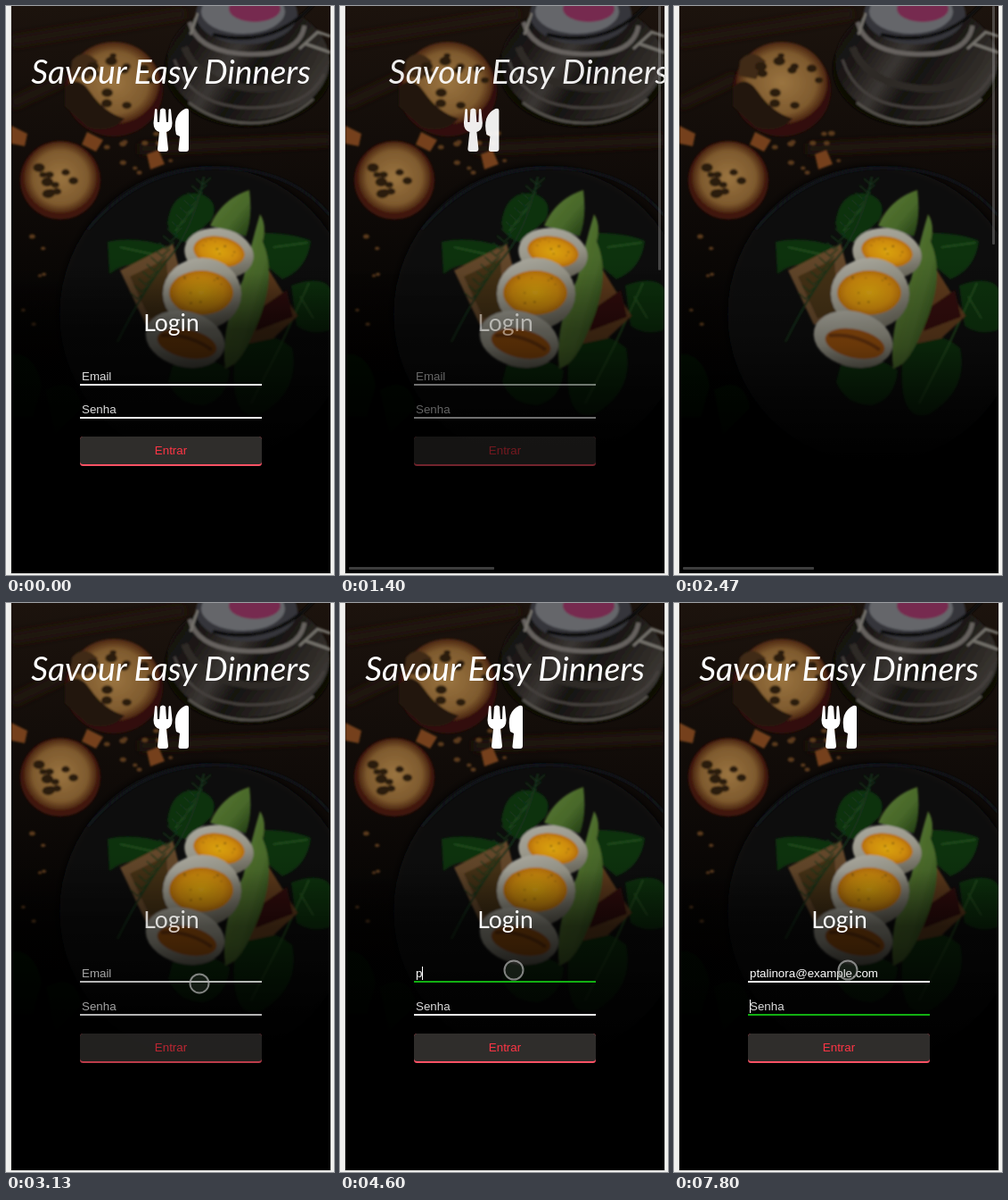
Animation of 368 by 637 pixels, one loop 8000 ms. Source, as an HTML page:

```html
<!DOCTYPE html>
<html lang="pt">
<head>
<meta charset="utf-8">
<title>Login</title>
<style>
  html, body { margin: 0; width: 100%; height: 100%; overflow: hidden; background: #f1f1ef; }
  svg { display: block; width: 100vw; height: 100vh; }
  .display { font-family: Lato, sans-serif; text-anchor: middle; fill: #fff; }
  .ui { font: 13.333px "Liberation Sans", Arial, sans-serif; }
</style>
</head>
<body>
<svg viewBox="0 0 368 637">
  <defs>
    <clipPath id="page"><rect x="6" width="358" height="635"/></clipPath>
    <linearGradient id="wood" x2="0" y2="1">
      <stop stop-color="#1c130d"/><stop offset=".3" stop-color="#100b08"/><stop offset=".7" stop-color="#000"/>
    </linearGradient>
    <linearGradient id="dusk" x2="0" y2="1">
      <stop offset=".44" stop-opacity="0"/><stop offset=".6" stop-opacity=".3"/>
      <stop offset=".7" stop-opacity=".7"/><stop offset=".8"/>
    </linearGradient>
    <linearGradient id="shade" x2="0" y2="1">
      <stop offset=".47" stop-opacity="0"/><stop offset=".57" stop-opacity=".5"/>
    </linearGradient>
    <linearGradient id="metal" x2="1" y2=".5">
      <stop stop-color="#080706"/><stop offset=".3" stop-color="#1d1917"/><stop offset=".5" stop-color="#3a3633"/>
      <stop offset=".65" stop-color="#151210"/><stop offset="1" stop-color="#383430"/>
    </linearGradient>
    <radialGradient id="cake"><stop stop-color="#9a7440"/><stop offset=".75" stop-color="#7e5a2e"/><stop offset="1" stop-color="#4a2410"/></radialGradient>
    <radialGradient id="yolk"><stop stop-color="#d9a313"/><stop offset=".7" stop-color="#cd8a08"/><stop offset="1" stop-color="#b36c06"/></radialGradient>
    <linearGradient id="white" x2=".6" y2="1"><stop stop-color="#aeada3"/><stop offset=".6" stop-color="#979588"/><stop offset="1" stop-color="#6f6c60"/></linearGradient>
    <linearGradient id="avocado" x2="1" y2="1"><stop stop-color="#5d7a34"/><stop offset=".6" stop-color="#48682a"/><stop offset="1" stop-color="#1f3a12"/></linearGradient>
    <filter id="soft"><feGaussianBlur stdDeviation=".8"/></filter>
    <filter id="blur"><feGaussianBlur stdDeviation="4"/></filter>
  </defs>

  <path d="M5.5 0V635.5H364.5V0" fill="#fffffd" stroke="#d6d6d4"/>

  <g id="screen" clip-path="url(#page)">
    <rect x="6" width="358" height="635" fill="url(#wood)"/>
    <g filter="url(#blur)">
      <path d="M6 40L200 8M6 110L70 80M150 160L364 150" stroke="#22170f" stroke-width="12"/>
      <ellipse cx="225" cy="345" rx="165" ry="166" fill="#07080b"/>
    </g>
    <g filter="url(#soft)">
      <path d="M92 250Q150 181 235 181T364 235" fill="none" stroke="#11141a" stroke-width="3"/>

      <!-- lantern -->
      <ellipse cx="272" cy="70" rx="94" ry="66" fill="#080706"/>
      <ellipse cx="272" cy="62" rx="91" ry="66" fill="url(#metal)"/>
      <path d="M205 108Q235 131 275 131T345 104" fill="none" stroke="#57534e" stroke-width="3"/>
      <path d="M189 60Q206 112 272 114T357 76" fill="none" stroke="#45403c" stroke-width="3"/>
      <path d="M200 46Q216 86 272 92T345 55" fill="none" stroke="#2f2b28" stroke-width="8"/>
      <path d="M206 18Q215 52 272 54T335 22" fill="none" stroke="#66625e" stroke-width="5"/>
      <ellipse cx="270" cy="9" rx="57" ry="34" fill="#35363a"/>
      <ellipse cx="266" cy="6" rx="47" ry="25" fill="#65666b"/>
      <ellipse cx="279" cy="3" rx="29" ry="15" fill="#762a50"/>
      <path d="M215 8L207 32M329 48L350 29L364 34M335 42L364 52" fill="none" stroke="#76736d" stroke-width="3"/>
      <path d="M232 32Q300 48 345-2" fill="none" stroke="#0d0b0a" stroke-width="4"/>

      <!-- muffins and crumbs -->
      <ellipse cx="121" cy="94" rx="55" ry="52" fill="#321008"/>
      <ellipse cx="121" cy="86" rx="51" ry="46" fill="url(#cake)"/>
      <path d="M66 92Q80 75 95 97T133 126Q118 143 92 136L66 112Z" fill="#24160d"/>
      <path d="M74 61Q87 46 103 62L92 82L72 78Z" fill="#3f2915"/>
      <ellipse cx="61" cy="195" rx="45" ry="44" fill="#40140a"/>
      <ellipse cx="61" cy="192" rx="41" ry="40" fill="url(#cake)"/>
      <g id="raisins" fill="#2c1c10"></g>
      <g id="crumbs" fill="#5b3a1e"></g>
      <path d="M6 134L24 143L21 157L6 154ZM91 141L109 150L101 163L85 155ZM158 166L171 161L178 177L162 183Z" fill="#74401c"/>

      <!-- greens and bread -->
      <g fill="#0c3010">
        <path d="M114 264Q145 257 184 270L165 295Q140 282 116 300Z"/>
        <path d="M181 243Q186 205 218 210Q240 218 231 239L204 265Q185 262 181 243Z"/>
        <path d="M290 254Q325 255 342 263Q338 295 310 306L285 285Z"/>
        <path d="M320 313Q355 300 366 318V362Q342 370 326 358Z"/>
        <path d="M257 387Q290 355 321 383Q331 430 286 457Q249 468 257 387Z"/>
        <path d="M187 402Q225 386 251 408Q248 440 222 447Q193 447 182 421Z"/>
        <path d="M6 390Q32 387 40 425L30 460H6ZM45 430Q78 412 85 450L55 480Z" opacity=".35"/>
      </g>
      <path d="M190 252L215 220M128 270L165 278M300 270L338 265M275 445L308 380L340 310M345 350L330 325" fill="none" stroke="#234d1d" stroke-width="2"/>
      <path d="M128 296L187 266L208 345L157 357Z" fill="#63462a"/>
      <path d="M139 303L180 283L184 342L161 350Z" fill="#453019"/>
      <path d="M282 275L327 347L300 372L262 380Z" fill="#5f3a1f"/>
      <path d="M283 340L315 318L322 348L280 364Z" fill="#33100a"/>

      <!-- avocado and eggs -->
      <path d="M229 246Q242 216 273 206Q277 238 269 258Z" fill="url(#avocado)"/>
      <path d="M285 233Q293 245 288 264Q306 305 278 365Q263 402 246 406Q240 360 266 306Q274 270 285 233Z" fill="url(#avocado)"/>
      <ellipse cx="239" cy="277" rx="39" ry="28" fill="url(#white)" transform="rotate(10 239 277)"/>
      <ellipse cx="239" cy="275" rx="29" ry="17" fill="url(#yolk)" transform="rotate(10 239 275)"/>
      <ellipse cx="220" cy="322" rx="44" ry="40" fill="url(#white)"/>
      <ellipse cx="219" cy="321" rx="36" ry="25" fill="url(#yolk)"/>
      <ellipse cx="201" cy="373" rx="45" ry="31" fill="url(#white)" transform="rotate(14 201 373)"/>
      <ellipse cx="203" cy="378" rx="34" ry="16" fill="#95500f" transform="rotate(12 203 378)"/>
      <path d="M174 369Q203 366 231 385" fill="none" stroke="#6b3509" stroke-width="4"/>
      <g id="pepper" fill="#5c4411"></g>

      <path d="M222 191Q210 250 183 282T125 376" fill="none" stroke="#18331a" stroke-width="2"/>
      <path id="needles" fill="none" stroke="#16361a" stroke-width="1.500"/>
    </g>
    <rect x="6" width="358" height="635" fill="url(#dusk)"/>

    <text id="title" class="display" x="185" y="87" font-size="37.3" font-style="italic">Savour Easy Dinners</text>
    <g id="cutlery" fill="#fff">
      <path d="M167 116L165.500 131Q165.500 139 172 141L170 160Q170 163 173 163H179Q182 163 182 160L180 141Q186.500 139 186.500 131L185 116Q184 114 182.500 116L182 130H180L179 116Q176 113 173 116L172 130H170L169.500 116Q168 114 167 116Z"/>
      <path d="M205 117V160Q205 163 202 163H196Q193 163 193.500 160L195 146L191 144Q186 122 201 115Q205 114 205 117Z"/>
    </g>

    <g id="form">
      <rect x="6" width="358" height="635" fill="url(#shade)"/>
      <text class="display" x="185.500" y="364" font-size="26.5">Login</text>
      <text id="email" class="ui" x="85" y="419"></text>
      <text class="ui" x="85" y="456" fill="#ddd">Senha</text>
      <rect id="emailLine" x="83" y="423" width="204" height="2"/>
      <rect id="passLine" x="83" y="460" width="204" height="2"/>
      <rect x="83" y="482" width="204" height="33" rx="3.500" fill="#ff5265"/>
      <path d="M83 485.500Q83 482 86.500 482H283.500Q287 482 287 485.500V510Q287 513 283.500 513H86.500Q83 513 83 510Z" fill="#2f2d2b"/>
      <text class="ui" x="185" y="502" text-anchor="middle" fill="#ff3545">Entrar</text>
    </g>
    <rect id="caret" width="1" height="15" fill="#fff"/>
    <g id="bars" fill="#999" opacity=".4">
      <rect id="barY" x="357" width="3" rx="1"/>
      <rect id="barX" x="10" y="628" height="3" rx="1"/>
    </g>
    <circle id="touch" r="10.500" fill="#777" fill-opacity=".15" stroke="#aaa" stroke-opacity=".75" stroke-width="2"/>
  </g>
</svg>
<script>
const $ = id => document.getElementById(id);
const LOOP = 8000, FOCUS_EMAIL = 3830, FOCUS_PASS = 7800;
const ADDRESS = "ptalinora@example.com";
const KEY_TIMES = [4600, 4670, 4670, 4870, 4930, 5130, 5330, 5470, 5800, 5870, 6130,
  6330, 6400, 6670, 6730, 6930, 7130, 7270, 7400, 7400, 7600];
const TOUCH_PATH = [[2800, 385, 150], [3130, 217, 426], [3700, 195, 411]];

let seed = 7;
const random = () => (seed = seed * 16807 % 2147483647) / 2147483647;

function scatter(id, count, cx, cy, rx, ry, size) {
  for (let i = 0; i < count; i++) {
    const angle = random() * 2 * Math.PI, reach = Math.sqrt(random()), r = size * (.5 + random() / 2);
    $(id).insertAdjacentHTML("beforeend", `<ellipse cx="${cx + rx * reach * Math.cos(angle)}"
      cy="${cy + ry * reach * Math.sin(angle)}" rx="${r}" ry="${r * .75}"/>`);
  }
}
scatter("raisins", 11, 128, 83, 36, 34, 7);
scatter("raisins", 10, 61, 190, 30, 30, 7);
scatter("crumbs", 12, 145, 160, 45, 28, 4);
scatter("crumbs", 6, 30, 300, 16, 60, 4);
scatter("pepper", 9, 238, 272, 22, 12, 1.2);
scatter("pepper", 9, 218, 316, 28, 18, 1.2);

let needles = "";
for (let i = 0; i < 17; i++) {
  const x = 221 - i * 4.6, y = 200 + i * 8;
  needles += `M${x - 8} ${y - 7}L${x} ${y}L${x + 9} ${y - 8}`;
}
$("needles").setAttribute("d", needles);

const clamp = v => Math.max(0, Math.min(1, v));

// CSS "ease": cubic-bezier(.25, .1, .25, 1)
function ease(x) {
  x = clamp(x);
  if (x === 0 || x === 1) return x;
  const curve = (u, a, b) => 3 * u * (1 - u) ** 2 * a + 3 * u * u * (1 - u) * b + u ** 3;
  let low = 0, high = 1;
  for (let i = 0; i < 24; i++) {
    const mid = (low + high) / 2;
    if (curve(mid, .25, .25) < x) low = mid; else high = mid;
  }
  return curve(low, .1, 1);
}

const set = (id, attrs) => { for (const k in attrs) $(id).setAttribute(k, attrs[k]); };
const show = (id, on) => set(id, { visibility: on ? "inherit" : "hidden" });

function loadAge(t) {
  if (t < 670) return 5000;
  if (t < 1000) return -1;
  if (t < 2270) return t - 1000;
  return t < 2470 ? -1 : t - 2470;
}

function drawPage(age) {
  set("screen", { visibility: age < 0 ? "hidden" : "visible" });
  const slide = ease(age / 600), offset = 358 * (1 - slide);
  set("title", { transform: `translate(${offset})`, opacity: slide });
  set("cutlery", { transform: `translate(${-offset})`, opacity: slide });
  set("form", { opacity: ease(age / 1500) });
  show("bars", age >= 0 && age < 600);
  const growth = clamp(age / 600);
  set("barX", { width: 147 + 24 * growth });
  set("barY", { height: 267 + 43 * growth });
}

function drawFields(t) {
  const typed = KEY_TIMES.filter(k => k <= t).length;
  const onEmail = t >= FOCUS_EMAIL && t < FOCUS_PASS, onPass = t >= FOCUS_PASS;
  const lineColor = on => on ? "#12b012" : "#f4f4f4";
  $("email").textContent = typed ? ADDRESS.slice(0, typed) : "Email";
  set("email", { fill: typed ? "#fff" : "#ddd" });
  set("emailLine", { fill: lineColor(onEmail) });
  set("passLine", { fill: lineColor(onPass) });

  const lastInput = onPass ? FOCUS_PASS : typed ? KEY_TIMES[typed - 1] : FOCUS_EMAIL;
  const caretOn = (onEmail || onPass) && (t - lastInput) % 1000 < 500;
  show("caret", caretOn);
  if (caretOn) set("caret", {
    x: 85 + (onEmail && typed ? Math.round($("email").getComputedTextLength()) : 0),
    y: onPass ? 444 : 407
  });
}

function drawTouch(t) {
  show("touch", t >= TOUCH_PATH[0][0]);
  const leg = t < TOUCH_PATH[1][0] ? 0 : 1;
  const [t0, x0, y0] = TOUCH_PATH[leg], [t1, x1, y1] = TOUCH_PATH[leg + 1];
  const p = ease((t - t0) / (t1 - t0));
  set("touch", { cx: x0 + (x1 - x0) * p, cy: y0 + (y1 - y0) * p });
}

const start = performance.now();
function frame() {
  const t = (performance.now() - start) % LOOP;
  drawPage(loadAge(t));
  drawFields(t);
  drawTouch(t);
  requestAnimationFrame(frame);
}
frame();
</script>
</body>
</html>
```
